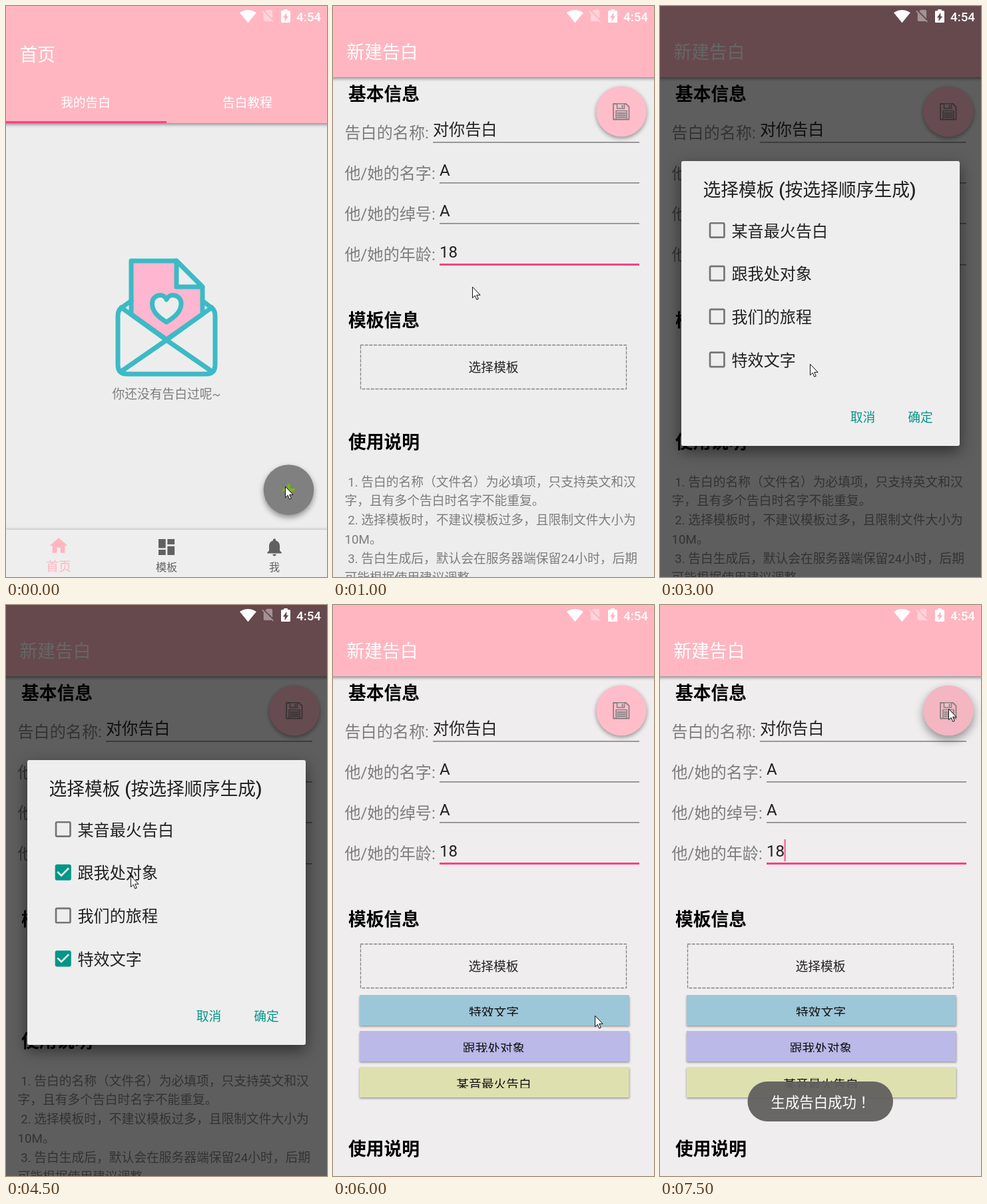
An HTML page with a canvas that plays this animation: 482 px wide and 858 px high, repeating every 8 s.

```html
<!DOCTYPE html>
<html lang="zh-CN">
<head>
<meta charset="utf-8">
<style>
html, body { margin: 0; width: 100%; height: 100%; overflow: hidden; background: #ededed; }
canvas { display: block; width: 482px; height: 858px; }
</style>
</head>
<body>
<canvas id="stage" width="482" height="858"></canvas>
<script>
const ctx = document.getElementById('stage').getContext('2d');
const W = 482, H = 858, LOOP = 8000;
const FONT = 'Roboto, "Noto Sans CJK SC", "Noto Sans CJK", sans-serif';
// Korean forms keep full-width punctuation centred in its cell
const MARK_FONT = '"Noto Sans CJK KR", "Noto Sans CJK", sans-serif';
const MARKS = /([（），！])/;
const PINK = '#ffb6c1', ACCENT = '#ff4081', TEAL = '#009688', BG = '#ededed';
const GREY = '#7d7d7d', INK = '#212121', NAV = '#616161';

// Text sizes in px for 12, 14, 16, 18 and 20 sp
const S12 = 16.07, S14 = 18.75, S16 = 21.42, S18 = 24.1, S20 = 26.78;

const ICONS = {
  home: 'M10 20v-6h4v6h5v-8h3L12 3 2 12h3v8z',
  board: 'M3 13h8V3H3zM3 21h8v-6H3zM13 21h8V11h-8zM13 3v6h8V3z',
  bell: 'M12 22c1.1 0 2-.9 2-2h-4c0 1.1.9 2 2 2zm6-6v-5c0-3.07-1.64-5.64-4.5-6.32V4c0-.83-.67-1.5-1.5-1.5s-1.5.67-1.5 1.5v.68C7.63 5.36 6 7.92 6 11v5l-2 2v1h16v-1z',
  wifi: 'M12 21.49L23.64 7c-.45-.34-4.93-4-11.64-4S.81 6.66.36 7z',
  sim: 'M19 5c0-1.1-.9-2-2-2h-7L7.66 5.34 19 16.68zM3.65 3.88L2.38 5.15 5 7.77V19c0 1.1.9 2 2 2h10c.35 0 .67-.1.96-.26l1.88 1.88 1.27-1.27z',
  battery: 'M15.67 4H14V2h-4v2H8.33C7.6 4 7 4.6 7 5.33v15.34C7 21.4 7.6 22 8.33 22h7.34c.73 0 1.33-.6 1.33-1.33V5.33C17 4.6 16.4 4 15.67 4zM11 20v-5.5H9L13 7v5.5h2z',
  check: 'M19 3H5c-1.1 0-2 .9-2 2v14c0 1.1.9 2 2 2h14c1.1 0 2-.9 2-2V5c0-1.1-.9-2-2-2zM10 17l-5-5 1.41-1.41L10 14.17l7.59-7.59L19 8z',
  full: 'M19 3H5c-1.1 0-2 .9-2 2v14c0 1.1.9 2 2 2h14c1.1 0 2-.9 2-2V5c0-1.1-.9-2-2-2z',
  empty: 'M19 5v14H5V5zM19 3H5c-1.1 0-2 .9-2 2v14c0 1.1.9 2 2 2h14c1.1 0 2-.9 2-2V5c0-1.1-.9-2-2-2z',
  arrow: 'M.5.5v16.2l3.7-3.5 2.6 6 2.5-1.1-2.6-5.8h5z'
};
for (const k in ICONS) ICONS[k] = new Path2D(ICONS[k]);

function rect(x, y, w, h, color) {
  ctx.fillStyle = color;
  ctx.fillRect(x, y, w, h);
}

function text(str, x, y, size, color, weight = 400, align = 'left') {
  ctx.textAlign = align;
  ctx.fillStyle = color;
  for (const run of str.split(MARKS)) {
    ctx.font = `${weight} ${size}px ${MARKS.test(run) ? MARK_FONT : FONT}`;
    ctx.fillText(run, x, y);
    x += ctx.measureText(run).width;
  }
}

function icon(name, x, y, sx, sy, color) {
  ctx.save();
  ctx.translate(x, y);
  ctx.scale(sx, sy);
  ctx.fillStyle = color;
  ctx.fill(ICONS[name], 'evenodd');
  ctx.restore();
}

function shadowed(blur, dy, alpha, draw) {
  ctx.save();
  ctx.shadowColor = `rgba(0,0,0,${alpha})`;
  ctx.shadowBlur = blur;
  ctx.shadowOffsetY = dy;
  draw();
  ctx.restore();
}

function disc(x, y, r, color) {
  ctx.beginPath();
  ctx.arc(x, y, r, 0, Math.PI * 2);
  ctx.fillStyle = color;
  ctx.fill();
}

function pill(x, y, w, h, r, color) {
  ctx.beginPath();
  ctx.roundRect(x, y, w, h, r);
  ctx.fillStyle = color;
  ctx.fill();
}

function line(d, width, color, fill) {
  const p = new Path2D(d);
  if (fill) { ctx.fillStyle = fill; ctx.fill(p); }
  ctx.lineWidth = width;
  ctx.strokeStyle = color;
  ctx.lineJoin = ctx.lineCap = 'round';
  ctx.stroke(p);
}

function header(h) {
  shadowed(5, 2, 0.45, () => rect(-10, -10, W + 20, h + 10, PINK));
}

function statusBar() {
  icon('wifi', 350.6, 2.8, 1.07, 1.04, '#fff');
  icon('sim', 382, 3, 0.95, 0.95, 'rgba(255,255,255,.4)');
  icon('battery', 403.2, 3, 1.4, 1, '#fff');
  text('4:54', 436, 22.5, S14, '#fff', 500);
}

function cursor(x, y) {
  ctx.save();
  ctx.translate(x, y);
  ctx.fillStyle = '#fff';
  ctx.fill(ICONS.arrow);
  ctx.lineWidth = 1;
  ctx.lineJoin = 'miter';
  ctx.strokeStyle = '#111';
  ctx.stroke(ICONS.arrow);
  ctx.restore();
}

function envelope() {
  const c = '#3cbac6', w = 7;
  line('M188 463V383H256L295 422V463L241 501Z', w, c, '#ffb6d0');
  line('M256 383V422H295Z', w, c, BG);
  line('M241 475C228 467 219.5 459 219.5 447C219.5 434 236 430 241 441C246 430 263 434 263 447C263 459 254 467 241 475Z', w, c, BG);
  line('M188 443L174 453Q168 457 168 465V539Q168 553 182 553H300Q314 553 314 539V465Q314 457 308 453L295 443', w, c);
  line('M173 453L241 502L309 453M241 502L173 549M241 502L309 549', w, c);
}

function homePage(pressed) {
  rect(0, 0, W, H, BG);
  header(176);
  text('首页', 20.5, 82.5, S20, '#fff');
  text('我的告白', 119.5, 151.5, S14, '#fff', 500, 'center');
  text('告白教程', 362.5, 151.5, S14, '#fff', 500, 'center');
  rect(0, 173, 241, 3, ACCENT);
  envelope();
  text('你还没有告白过呢~', 241, 590, S14, GREY, 400, 'center');

  shadowed(pressed ? 15 : 9, pressed ? 8 : 4, 0.4, () => disc(424.5, 727, 37.8, '#808080'));
  rect(415.5, 725, 18, 4, '#7cb518');
  rect(422.5, 718, 4, 18, '#7cb518');

  shadowed(4, -1, 0.2, () => rect(-10, 787, W + 20, 90, '#eeeeee'));
  icon('home', 63, 795, 1.339, 1.339, PINK);
  icon('board', 225, 797, 1.339, 1.339, NAV);
  icon('bell', 387, 797, 1.339, 1.339, NAV);
  text('首页', 79, 849, S14, PINK, 400, 'center');
  text('模板', 241, 848.5, S12, NAV, 400, 'center');
  text('我', 403, 848.5, S12, NAV, 400, 'center');
}

function saveButton(press) {
  const color = press ? '#f4b6c1' : '#ffbdc9';
  shadowed(press > 1 ? 14 : 6, press > 1 ? 6 : 2.5, 0.4, () => disc(433, 158.5, 37.8, color));
  const c = '#8c8082', light = '#e3c6cb';
  line('M421 147H440L444.5 151.5V170.5H421Z', 1.8, c);
  line('M426.5 147.5V154H437.5V147.5', 1.6, c, light);
  line('M434.5 149.5V152', 1.8, c);
  line('M425 170V157.5H441V170Z', 1.6, c, light);
  line('M427 161H439M427 164H439M427 167H439', 1.8, c);
}

const FIELDS = [['告白的名称:', '对你告白', 150], ['他/她的名字:', 'A', 160],
  ['他/她的绰号:', 'A', 160], ['他/她的年龄:', '18', 160]];
const NOTES = [' 1. 告白的名称（文件名）为必填项，只支持英文和汉', '字，且有多个告白时名字不能重复。',
  ' 2. 选择模板时，不建议模板过多，且限制文件大小为', '10M。',
  ' 3. 告白生成后，默认会在服务器端保留24小时，后期', '可能根据使用建议调整。'];
const CARDS = [['特效文字', '#9cc7d8'], ['跟我处对象', '#bbb9e8'], ['某音最火告白', '#dfe0b0']];

function card([label, color], i) {
  const y = 586 + i * 54;
  shadowed(3, 1.5, 0.4, () => rect(40, y, 404.5, 46, color));
  ctx.save();
  ctx.beginPath();
  ctx.rect(40, y + 17.5, 405, 14.5);
  ctx.clip();
  text(label, 241.5, y + 32.5, S14, '#111', 500, 'center');
  ctx.restore();
}

function formPage({ caret, done, focused, press }) {
  rect(0, 0, W, H, done ? '#efedee' : BG);
  header(107);
  text('新建告白', 20.5, 79, S20, '#fff');
  text('基本信息', 23, 141.5, S20, '#000', 700);

  FIELDS.forEach(([label, value, x], i) => {
    const dy = i * 61.3, active = i === 3 && focused;
    text(label, 17.5, 198.5 + dy, S18, GREY);
    text(value, x, 193.8 + dy, S18, INK);
    rect(x, Math.round((active ? 203 : 203.7) + dy), 460 - x, active ? 3 : 1.6, active ? ACCENT : '#858585');
  });
  if (caret) rect(186.3, 352, 2.6, 33, '#f8719d');

  text('模板信息', 23, 482, S20, '#000', 700);
  ctx.save();
  ctx.setLineDash([4, 2.7]);
  ctx.lineWidth = 1.3;
  ctx.strokeStyle = '#858585';
  ctx.strokeRect(41.5, 509.5, 399, 66);
  ctx.restore();
  text('选择模板', 241, 549.5, S14, INK, 500, 'center');

  const shift = done ? 162 : 0;
  if (done) CARDS.forEach(card);
  text('使用说明', 23, 664.5 + shift, S20, '#000', 700);
  NOTES.forEach((s, i) => text(s, 17.5, 721.5 + shift + i * 28.8, S14, GREY));
  saveButton(press);
}

function dialog({ checks, ripple }) {
  rect(0, 0, W, H, 'rgba(0,0,0,.6)');
  shadowed(22, 8, 0.5, () => pill(32, 233, 418, 428, 3, '#eeeeee'));
  text('选择模板 (按选择顺序生成)', 64.5, 285.5, S20, INK, 500);
  if (ripple) {
    ctx.save();
    ctx.beginPath();
    ctx.rect(32, 305, 418, 64.7);
    ctx.clip();
    disc(217.5, 337, 151.5, 'rgba(0,0,0,.08)');
    ctx.restore();
  }
  ['某音最火告白', '跟我处对象', '我们的旅程', '特效文字'].forEach((s, i) => {
    const y = 337 + i * 64.8, box = checks[i];
    icon(box, 69.7, y - 16.1, 1.339, 1.339, box === 'empty' ? '#757575' : TEAL);
    text(s, 107.5, y + 9.5, S18, INK);
  });
  text('取消', 304.5, 625, S14, TEAL, 500, 'center');
  text('确定', 391, 625, S14, TEAL, 500, 'center');
}

function toast() {
  pill(131.5, 716, 218.5, 60, 30, 'rgba(96,95,94,.94)');
  text('生成告白成功！', 166.5, 754.5, S16, '#fff');
}

const STEP = 500;
const POINTER = [[419, 722], [419, 722], [209, 422], [209, 422], [231, 503], [225, 538],
  [225, 538], [214, 394], [137, 335], [187, 407], [200, 338], [403, 599],
  [393, 617], [323, 476], [433, 156], [433, 156]];

function draw(t) {
  const at = Math.floor(t / STEP), ms = at * STEP;
  if (ms < 1000) {
    homePage(ms >= 500);
  } else {
    const open = ms >= 3000 && ms < 6000;
    const tick = since => ms >= since ? 'check' : 'empty';
    formPage({
      caret: ms === 1500 || ms === 2500 || ms === 7500,
      done: ms >= 6000,
      focused: !open,
      press: ms >= 7500 ? 2 : ms >= 7000 ? 1 : 0
    });
    if (open) dialog({
      checks: [tick(5000), ms === 3500 ? 'full' : tick(4000), 'empty', tick(3500)],
      ripple: ms === 5000
    });
    if (ms >= 7500) toast();
  }
  statusBar();
  cursor(...POINTER[at]);
}

const start = performance.now();
function loop() {
  draw((performance.now() - start) % LOOP);
  requestAnimationFrame(loop);
}
loop();
</script>
</body>
</html>
```
